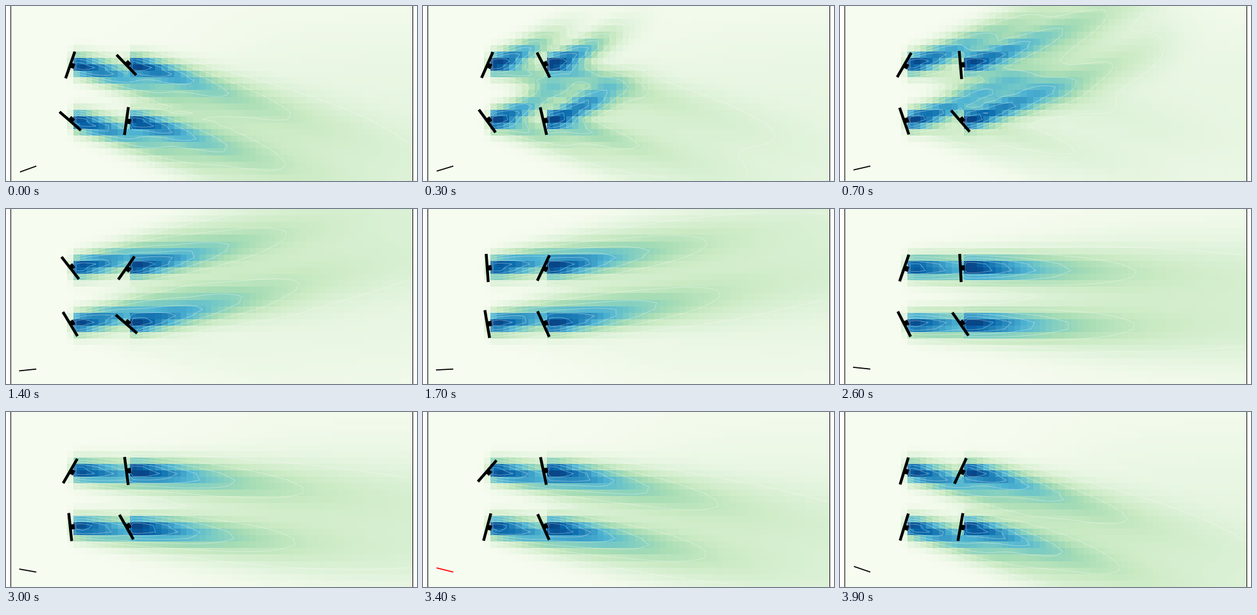
Recreate the animation shown at these times as a matplotlib script. Size 640 by 273 pixels, loop 4 s.

```python
import numpy as np
import matplotlib.pyplot as plt
from matplotlib.animation import FuncAnimation

W, H = 640, 273
FRAMES, INTERVAL = 40, 100
LEFT, RIGHT = 7, 633.5
COLS, ROWS = 64, 27
PX = 0.72  # points per pixel at 100 dpi

# Turbine hubs: upper pair, then lower pair
HUBS = [(x, y) for y in (92, 179.5) for x in (100, 187.5)]
OLD_ANGLE = 18  # wake angle left over from the end of the sweep

# Blade tilt from vertical in degrees, a few poses per turbine
POSE_TIMES = [0, 7, 14, 21, 26, 34, 39]
POSES = [
    [19, 30, -38, 41, 19, 41, 17],
    [-44, -5, 35, 13, -3, -12, 25],
    [-49, -19, -31, 19, -27, 15, 17],
    [8, -41, -49, 8, -35, -24, 10],
]

xs = LEFT + (np.arange(COLS) + 0.5) * (RIGHT - LEFT) / COLS
ys = (np.arange(ROWS) + 0.5) * H / ROWS
X, Y = np.meshgrid(xs, ys)

# Thin mixed air far downstream
HAZE = 0.08 / (1 + np.exp((330 - X) / 60)) * np.exp(-0.5 * ((Y - 136) / 90) ** 2)


def sigmoid(v):
    return 1 / (1 + np.exp(-np.clip(v, -50, 50)))


def wake(hub, angle):
    """Speed deficit behind one turbine."""
    d = X - hub[0]
    pos = np.maximum(d, 0)
    depth = 1.07 / (1 + 0.0045 * pos + 4.4e-5 * pos ** 2)
    bend = 1.06 * np.tan(np.radians(angle)) * pos ** 2 / (pos + 35)
    width = 12 + 0.055 * pos
    onset = sigmoid((d - 3.5) / 2.3)
    offset = (Y - hub[1] + 0.5 - bend) / width
    return depth * onset * np.exp(-0.5 * offset ** 2)


def deficit(t):
    """Fresh wakes grow behind a front while the old ones fade."""
    angle = 1.2 * (t - 25)  # the wake lags the wind
    total = HAZE.copy()
    for row in (HUBS[:2], HUBS[2:]):
        power = 0
        for hub in row:
            share = sigmoid((55 * t - 60 - (X - hub[0])) / 25)
            fresh = share * wake(hub, angle)
            old = np.exp(-t / 6) * wake(hub, OLD_ANGLE)
            power = power + fresh ** 2.5 + old ** 2.5
        total += power ** 0.4
    return np.minimum(total, 0.98)


fig = plt.figure(figsize=(W / 100, H / 100), dpi=100, facecolor="white")
ax = fig.add_axes([0, 0, 1, 1])
ax.set_xlim(0, W)
ax.set_ylim(H, 0)
ax.axis("off")

image = ax.imshow(np.zeros((ROWS, COLS)), cmap="GnBu", vmin=0, vmax=1,
                  extent=(LEFT, RIGHT, H, 0), aspect="auto",
                  interpolation="nearest")
for x in (7, 633):
    ax.plot([x, x], [0, H], color="black", lw=PX, zorder=4)


def stroke(width):
    return ax.plot([], [], color="black", lw=width * PX,
                   solid_capstyle="butt", zorder=5)[0]


blades = [stroke(4.4) for _ in HUBS]
nacelles = [stroke(8) for _ in HUBS]
vane = stroke(1.7)
contours = None


def draw(t):
    global contours
    field = deficit(t)
    image.set_data(field)
    if contours is not None:
        contours.remove()
    contours = ax.contour(xs, ys, field, levels=np.arange(1, 7) / 7,
                          colors="white", alpha=0.38, linewidths=0.9 * PX,
                          zorder=3)

    for (x, y), poses, blade, nacelle in zip(HUBS, POSES, blades, nacelles):
        a = np.radians(np.interp(t, POSE_TIMES, poses, period=FRAMES))
        c, s = np.cos(a), np.sin(a)
        blade.set_data([x - 22 * s, x + 22 * s], [y + 22 * c, y - 22 * c])
        nacelle.set_data([x, x + 7 * c], [y, y + 7 * s])

    wind = np.radians(20 - t)
    vane.set_data([47.2 - 27 * np.cos(wind), 47.2],
                  [249.7 + 27 * np.sin(wind), 249.7])
    vane.set_color("red" if t % 13 == 8 else "black")
    return [image, vane, *blades, *nacelles]


anim = FuncAnimation(fig, draw, frames=FRAMES, interval=INTERVAL,
                     init_func=lambda: draw(0), repeat=True, repeat_delay=0,
                     blit=False)
plt.show()
```
